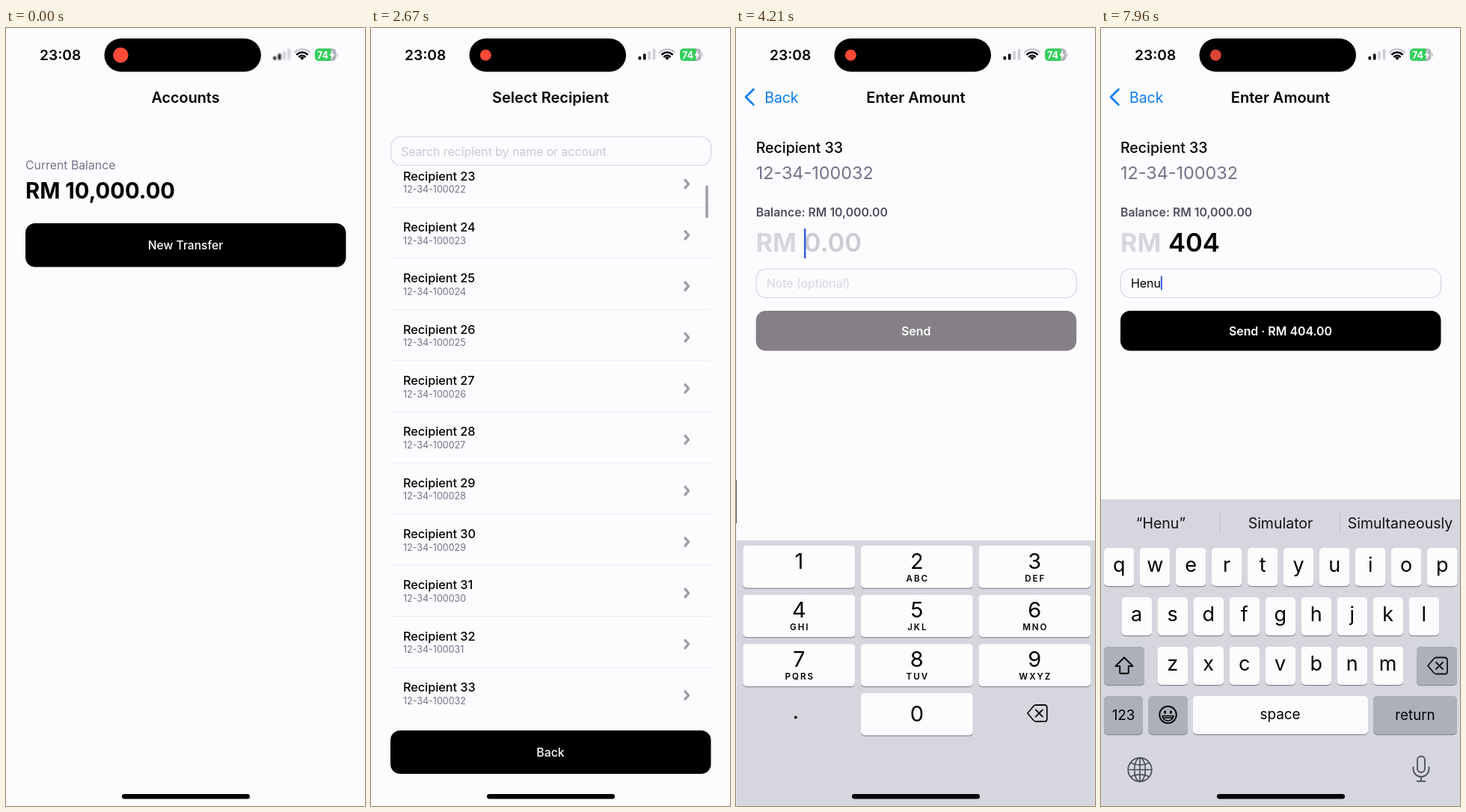
An HTML page that plays this animation: 480x1040 px, repeating every 8 s.

```html
<!DOCTYPE html>
<html lang="en">
<head>
<meta charset="utf-8">
<title>Transfer</title>
<style>
  html, body { margin: 0; width: 100%; height: 100%; overflow: hidden; background: #fcfcff; }
  svg { display: block; width: 100vw; height: 100vh; }
  text { font-family: Inter, Roboto, sans-serif; white-space: pre; }
  .dim { mix-blend-mode: multiply; }
  .screen { isolation: isolate; }
</style>
</head>
<body>
<svg id="stage" viewBox="0 0 480 1040" xmlns="http://www.w3.org/2000/svg"></svg>
<script>
const LOOP = 8000;
const BG = '#fcfcff', MUTED = '#74728a', PALE = '#d6d4df', BOARD = '#d5d6de', GREY = '#abb0bb', BLUE = '#0a7cf5';
const SHADE = '#ebe5f4', DISABLED = '#858086', ICON = '#4d4f57';
const ROW = 68.35, LIST_TOP = 184, POOL = 13;

// ---- markup helpers ----
const rect = (x, y, w, h, r, fill, more = '') =>
  `<rect x="${x}" y="${y}" width="${w}" height="${h}" rx="${r}" fill="${fill}" ${more}/>`;
const line = (d, color, w, more = '') =>
  `<path d="${d}" fill="none" stroke="${color}" stroke-width="${w}" stroke-linecap="round" stroke-linejoin="round" ${more}/>`;
// y is the middle of the capital letters
const text = (s, x, y, size, weight = 400, fill = '#000', anchor = 'start', more = '') =>
  `<text x="${x}" y="${(y + size * 0.362).toFixed(2)}" font-size="${size}" font-weight="${weight}" fill="${fill}" text-anchor="${anchor}" ${more}>${s}</text>`;
const mid = (s, x, y, size, weight, fill, more) => text(s, x, y, size, weight, fill, 'middle', more);
const group = (id, body, more = '') => `<g id="${id}" ${more}>${body}</g>`;
const key = (x, y, w, h, fill, id = '') =>
  rect(x, y + 1.3, w, h, 5, '#8b8d95') + rect(x, y, w, h, 5, fill, id && `id="${id}"`);
const field = (y, h) => rect(26.5, y, 428, h, 13, BG, `stroke="${PALE}" stroke-width="1.2"`);
const eraser = (x, y) =>
  line(`M${x - 13} ${y}l8 -9.5q1.4 -1.5 3.4 -1.5h11q3.6 0 3.6 3.6v14.8q0 3.6 -3.6 3.6h-11q-2 0 -3.4 -1.5z`, '#111', 1.8) +
  line(`M${x - 2} ${y - 4.5}l9 9m0 -9l-9 9`, '#111', 1.8);

// ---- parts ----
function statusBar() {
  const bars = [4.5, 8, 11.5, 14.5].map((h, i) =>
    rect(357.5 + i * 6.4, 42.5 - h, 3.6, h, 1, i < 2 ? '#000' : '#cfced6')).join('');
  const wifi = [5.5, 10, 14.2].map((r, i) => {
    const d = r * 0.68;
    return line(`M${396 - d} ${42 - d}A${r} ${r} 0 0 1 ${396 + d} ${42 - d}`, i < 2 ? '#000' : '#c4c3cc', 2.6, 'stroke-linecap="butt"');
  }).join('') + '<path d="M396 43l-2.8 -3.2a4 4 0 0 1 5.6 0z"/>';
  return text('23:08', 45, 36, 19.2, 600) +
    rect(131.5, 14, 209.5, 44.5, 22.2, '#000') +
    '<circle id="dot" cx="153.3" cy="36.3" r="7.5"/>' +
    group('signal', bars) + wifi +
    '<clipPath id="cell"><rect x="413" y="27.5" width="28.5" height="16.5" rx="5"/></clipPath>' +
    `<g clip-path="url(#cell)">${rect(413, 27, 29, 18, 0, '#b3b3bb')}${rect(413, 27, 21.5, 18, 0, '#34cf5c')}</g>` +
    rect(442.4, 33.4, 1.5, 5, 0.7, '#c4c3cc') +
    text('74', 416, 36, 12.6, 700, '#fff') +
    '<path d="M437.4 29.5l-5 7.2h3l-1 5.6 5 -7.4h-3z" fill="#fff"/>';
}

function accounts() {
  return rect(0, 119, 480, 921, 0, BG) +
    text('Current Balance', 26, 183, 15.8, 400, MUTED) +
    text('RM 10,000.00', 26, 217.5, 29.2, 700) +
    rect(26, 261, 428.5, 58.5, 13, '#000') +
    mid('New Transfer', 240, 290.5, 15.6, 500, '#fff');
}

function recipients() {
  const spokes = Array.from({ length: 8 }, (_, i) =>
    line('M0 -10.5V-18', '#fff', 6, `class="spoke" transform="translate(239 537) rotate(${i * 45})"`)).join('');
  const rows = Array.from({ length: POOL }, () =>
    `<g class="row">${text('', 43, 26.5, 16.2, 500)}${text('', 43, 44.5, 12.5, 400, MUTED)}` +
    line('M420 32l4.6 5.2 -4.6 5.2', '#9f9fa8', 3.4, 'stroke-linecap="butt" stroke-linejoin="miter"') +
    `<path d="M26 ${ROW}H454" stroke="#eeedf3" stroke-width="1.2"/></g>`).join('');
  return rect(0, 119, 480, 921, 0, BG) + field(145.5, 38) +
    text('Search recipient by name or account', 40, 165, 15.8, 400, '#c9c7d2') +
    group('loading', spokes + mid('Loading recipients...', 240, 579.5, 15.7, 400, MUTED)) +
    '<clipPath id="listClip"><rect id="listBox" y="184" width="480" height="729"/></clipPath>' +
    group('list', rows, 'clip-path="url(#listClip)"') +
    rect(447.2, 0, 3.6, 44, 1.8, '#a3a0a8', 'id="thumb"') +
    group('backBtn', rect(26, 939, 428.5, 58, 13, '#000') + mid('Back', 240, 968.5, 15.8, 500, '#fff'));
}

function amountScreen() {
  return rect(0, 119, 480, 921, 0, BG) +
    rect(0, 707, 480, 333, 0, SHADE, 'class="dim" id="dimC"') +
    text('Recipient 33', 26, 159.5, 19.5, 500) +
    text('12-34-100032', 26, 194, 23.4, 400, MUTED) +
    text('Balance: RM 10,000.00', 26, 246, 15.8, 600, '#504f60') +
    text('RM', 26, 287, 34.2, 700, BOARD) +
    text('', 90, 286.5, 34.6, 600, '#000', 'start', 'id="amount"') +
    rect(0, 268, 2.6, 40, 1, '#3c5fd0', 'id="amountCaret"') +
    field(322, 38.5) + text('', 40, 341.5, 15.9, 400, '#000', 'start', 'id="note"') +
    rect(0, 331.5, 2, 19, 1, '#3a62d8', 'id="noteCaret"') +
    rect(26, 378, 428.5, 53.5, 13, '#000', 'id="sendBox"') +
    mid('', 240, 405, 15.9, 600, '#fff', 'id="send"');
}

function numberPad() {
  const names = ['', 'ABC', 'DEF', 'GHI', 'JKL', 'MNO', 'PQRS', 'TUV', 'WXYZ'];
  const keys = names.map((s, i) => {
    const x = 8.5 + (i % 3) * 157.5, y = 692 + Math.floor(i / 3) * 65.7;
    return key(x, y, 150, 56.5, BG, 'pad' + (i + 1)) + mid(i + 1, x + 75, y + 20, 29, 400) +
      mid(s, x + 76, y + 43.5, 11.6, 600, '#000', 'style="letter-spacing:.17em"');
  }).join('');
  return keys + key(166, 889, 150, 56.5, BG, 'pad0') + mid('0', 241, 916, 29, 400) +
    '<circle cx="79" cy="921.5" r="1.9"/>' + eraser(402, 916);
}

const LETTERS = ['qwertyuiop', 'asdfghjkl', 'zxcvbnm'];
const keyAt = ch => {
  const r = LETTERS.findIndex(s => s.includes(ch));
  return { x: [4, 27.5, 75.5][r] + 48 * LETTERS[r].indexOf(ch), y: 695 + 66 * r };
};

function letterBoard() {
  const keys = [...LETTERS.join('')].map(ch => {
    const { x, y } = keyAt(ch);
    return key(x, y, 40.5, 51, BG) +
      `<text class="letter" data-ch="${ch}" x="${x + 20.2}" text-anchor="middle" data-y="${y}"></text>`;
  }).join('');
  const arrow = 'M31 841.5l11.5 11.5h-5.7v8.2q0 1.6 -1.6 1.6h-8.4q-1.6 0 -1.6 -1.6v-8.2h-5.7z';
  const face = '<circle cx="89.5" cy="918" r="11.3" fill="none" stroke="#000" stroke-width="1.9"/>' +
    '<ellipse cx="85.6" cy="914.5" rx="1.5" ry="2.2"/><ellipse cx="93.4" cy="914.5" rx="1.5" ry="2.2"/>' +
    line('M82 919.5h15a7.5 6.5 0 0 1 -15 0zM83 922h13', '#000', 1.5);
  const globe = `<g fill="none" stroke="${ICON}" stroke-width="1.7"><circle cx="52" cy="991.5" r="15.8"/>` +
    '<ellipse cx="52" cy="991.5" rx="7.4" ry="15.8"/><path d="M52 975.7v31.6M36.2 991.5h31.6M39.5 982.2q12.5 6 25 0M39.5 1000.8q12.5 -6 25 0"/></g>';
  const mic = `<rect x="423" y="973.5" width="10" height="21.5" rx="5" fill="none" stroke="${ICON}" stroke-width="1.8"/>` +
    line('M417.5 988v2.5a10.5 10.5 0 0 0 21 0V988M428 1001.5v5.2M422.5 1006.8h11', ICON, 1.8);
  const hints = [80, 240, 400].map(x => mid('', x, 662, 19.5, 400, '#111116', 'class="hint"')).join('');
  return group('hints', line('M159.5 646V675M319.5 646V675', '#bebfc8', 1) + hints) + keys +
    key(4, 827, 54, 51, BG, 'shiftKey') + line(arrow, '#000', 1.9, 'id="shift"') +
    key(422, 827, 54, 51, GREY) + eraser(450, 852.5) +
    key(4, 893, 52, 51, GREY) + mid('123', 30, 918.5, 18.8) +
    key(63.5, 893, 52.5, 51, GREY) + face +
    key(123, 893, 234, 51, BG) + mid('space', 239.5, 917, 18.9) +
    key(364, 893, 112, 51, GREY) + mid('return', 420, 918.5, 18.8) + globe + mic +
    group('popup', rect(-30, -60, 60, 62, 9, BG) + rect(-20.2, -8, 40.4, 59, 5, BG) +
      mid('', 0, -28, 35, 400, '#000', 'id="popLetter"'));
}

const dim = id => rect(0, 119, 480, 921, 0, SHADE, `class="dim" id="${id}"`);
const stage = document.getElementById('stage');
stage.innerHTML = rect(0, 0, 480, 1040, 0, BG) +
  group('screenA', accounts() + dim('dimA'), 'class="screen"') +
  group('screenB', recipients() + dim('dimB'), 'class="screen"') +
  group('screenC', amountScreen(), 'class="screen"') +
  group('board', rect(0, 0, 480, 420, 0, BOARD, 'id="boardBg"') + group('pad', numberPad()) + group('qwerty', letterBoard())) +
  rect(0, 0, 480, 119, 0, BG) +
  group('titleA', mid('Accounts', 240, 92.5, 19.8, 600)) +
  group('titleB', mid('Select Recipient', 240, 92.5, 20, 600)) +
  group('titleC', mid('Enter Amount', 240, 92.5, 20, 600)) +
  group('navArrow', line('M23.5 82L13 92.3L23.5 102.6', BLUE, 2.7)) +
  group('navBack', text('Back', 38, 92.5, 19.4, 400, BLUE)) +
  statusBar() + rect(155, 1024, 171, 6.5, 3.2, '#000');

// ---- updating ----
const el = {};
stage.querySelectorAll('[id]').forEach(n => el[n.id] = n);
const all = s => [...stage.querySelectorAll(s)];
const spokes = all('.spoke'), rows = all('.row'), letters = all('.letter'), hints = all('.hint');
const set = (n, a, v) => n.setAttribute(a, v);
const move = (n, x, y = 0) => set(n, 'transform', `translate(${x.toFixed(2)} ${y.toFixed(2)})`);
const fade = (n, v) => set(n, 'opacity', clamp(v).toFixed(3));
const show = (n, on) => set(n, 'display', on ? 'inline' : 'none');
const write = (n, s) => { if (n.textContent !== s) n.textContent = s; };
const clamp = v => Math.min(1, Math.max(0, v));
const inOut = u => u < 0.5 ? 4 * u ** 3 : 1 - (2 - 2 * u) ** 3 / 2;
// critically damped spring, returns the part done
const spring = (t, rate) => t <= 0 ? 0 : 1 - (1 + rate * t) * Math.exp(-rate * t);
const ramp = (t, from, to) => clamp((t - from) / (to - from));
const lastOf = (list, t) => list.filter(k => k.at <= t).pop();

const LOADED = 1700, FOCUS_AMOUNT = 3750, FOCUS_NOTE = 6000;
const digits = [{ ch: '4', at: 4850 }, { ch: '0', at: 5200 }, { ch: '4', at: 5560 }];
const typed = [{ ch: 'H', at: 6880 }, { ch: 'e', at: 7170 }, { ch: 'n', at: 7440 }, { ch: 'u', at: 7700 }];
const guesses = [[], ['He', 'Have'], ['Hello', 'Here'], ['Hen', 'Hence'], ['Simulator', 'Simultaneously']];
const entered = (list, t) => list.filter(k => k.at <= t).map(k => k.ch).join('');
const blink = (t, since) => (t - since) % 1000 < 600;

function drawPush(t, p1, p2) {
  move(el.screenA, -144 * p1);
  show(el.screenA, p1 < 0.999);
  fade(el.dimA, p1);
  move(el.screenB, 480 * (1 - p1) - 144 * p2);
  show(el.screenB, p1 > 0);
  fade(el.dimB, p2);
  move(el.screenC, 480 * (1 - p2));
  show(el.screenC, p2 > 0);
  fade(el.dimC, p2 * (1 - ramp(t, 3900, 4100)));

  move(el.titleA, -144 * p1);
  fade(el.titleA, 1 - 1.5 * p1);
  move(el.titleB, 480 * (1 - p1) - 113 * p2);
  fade(el.titleB, 1.2 * p1 * (1 - p2) ** 1.8);
  move(el.titleC, 325 * (1 - p2));
  fade(el.titleC, p2 ** 1.7);
  move(el.navBack, 141 * (1 - p2));
  fade(el.navBack, p2);
  fade(el.navArrow, p2);
}

function drawList(t) {
  const loaded = t >= LOADED, head = (Math.floor(t / 125) + 7) % 8;
  show(el.loading, !loaded);
  show(el.list, loaded);
  spokes.forEach((n, i) => {
    const age = (head - i + 8) % 8;
    set(n, 'stroke', ['#aaa8ae', '#b0aeb4', '#c8c6ce', '#d2d0d8'][age] || '#dfdde4');
  });
  const scroll = 1837.6 * spring(t - 2000, 1 / 211.5);
  const first = Math.floor(scroll / ROW);
  rows.forEach((n, i) => {
    const k = first + i;
    move(n, 0, LIST_TOP + k * ROW - scroll);
    write(n.children[0], 'Recipient ' + (k + 1));
    write(n.children[1], '12-34-' + (100000 + k));
  });
  set(el.thumb, 'y', 195 + scroll * 0.01);
  fade(el.thumb, ramp(t, 2000, 2080) * (1 - ramp(t, 3350, 3600)));
  const lift = 335 * inOut(ramp(t, 3767, 4117));
  move(el.backBtn, 0, -lift);
  set(el.listBox, 'height', 729 - lift);
}

function drawForm(t) {
  const sum = entered(digits, t), note = entered(typed, t), inNote = t >= FOCUS_NOTE;
  write(el.amount, sum || '0.00');
  set(el.amount, 'fill', sum ? '#000' : '#cdcad0');
  const lastDigit = lastOf(digits, t), lastChar = lastOf(typed, t);
  set(el.amountCaret, 'x', sum ? 91 + el.amount.getComputedTextLength() : 90.2);
  show(el.amountCaret, !inNote && blink(t, lastDigit ? lastDigit.at : FOCUS_AMOUNT));
  write(el.note, note || 'Note (optional)');
  set(el.note, 'fill', note ? '#000' : PALE);
  set(el.noteCaret, 'x', note ? 40 + el.note.getComputedTextLength() : 39.8);
  show(el.noteCaret, inNote && blink(t, lastChar ? lastChar.at : FOCUS_NOTE));
  write(el.send, sum ? `Send · RM ${sum}.00` : 'Send');
  set(el.sendBox, 'fill', sum ? '#000' : DISABLED);
}

function drawBoard(t) {
  move(el.board, 480 * (1 - spring(t - 3730, 0.018)));
  show(el.board, t > 3730);
  const swap = inOut(ramp(t, FOCUS_NOTE, FOCUS_NOTE + 260));
  set(el.boardBg, 'y', 685 - 55 * swap);
  fade(el.pad, 1 - swap);
  fade(el.qwerty, swap);
  show(el.qwerty, swap > 0);
  for (const d of '04') {
    const down = digits.some(k => k.ch === d && t >= k.at - 60 && t < k.at + 60);
    set(el['pad' + d], 'fill', down ? GREY : BG);
  }

  const note = entered(typed, t), upper = !note;
  letters.forEach(n => {
    const ch = n.dataset.ch;
    write(n, upper ? ch.toUpperCase() : ch);
    set(n, 'font-size', upper ? 24.5 : 27);
    set(n, 'y', +n.dataset.y + (upper ? 35 : 32));
  });
  set(el.shiftKey, 'fill', upper ? BG : GREY);
  set(el.shift, 'fill', upper ? '#000' : 'none');
  show(el.hints, !upper);
  [`“${note}”`, ...guesses[note.length]].forEach((s, i) => hints[i] && write(hints[i], s));

  const held = typed.find(k => t >= k.at - 50 && t < k.at + 60);
  show(el.popup, held);
  if (held) {
    const at = keyAt(held.ch.toLowerCase());
    move(el.popup, at.x + 20.2, at.y);
    write(el.popLetter, held.ch);
  }
}

function drawStatus(t) {
  const wake = ramp(t, 60, 350);
  set(el.dot, 'r', 10.2 - 2.7 * wake);
  set(el.dot, 'fill', t < 5960 ? '#ff4a38' : '#dc4638');
  el.signal.style.filter = wake < 1 ? `blur(${(1.2 * (1 - wake)).toFixed(2)}px)` : 'none';
}

function draw(t) {
  drawPush(t, spring(t - 915, 0.02), spring(t - 3716, 0.018));
  drawList(t);
  drawForm(t);
  drawBoard(t);
  drawStatus(t);
}

const start = performance.now();
function tick() {
  draw((performance.now() - start) % LOOP);
  requestAnimationFrame(tick);
}
tick();
</script>
</body>
</html>
```
